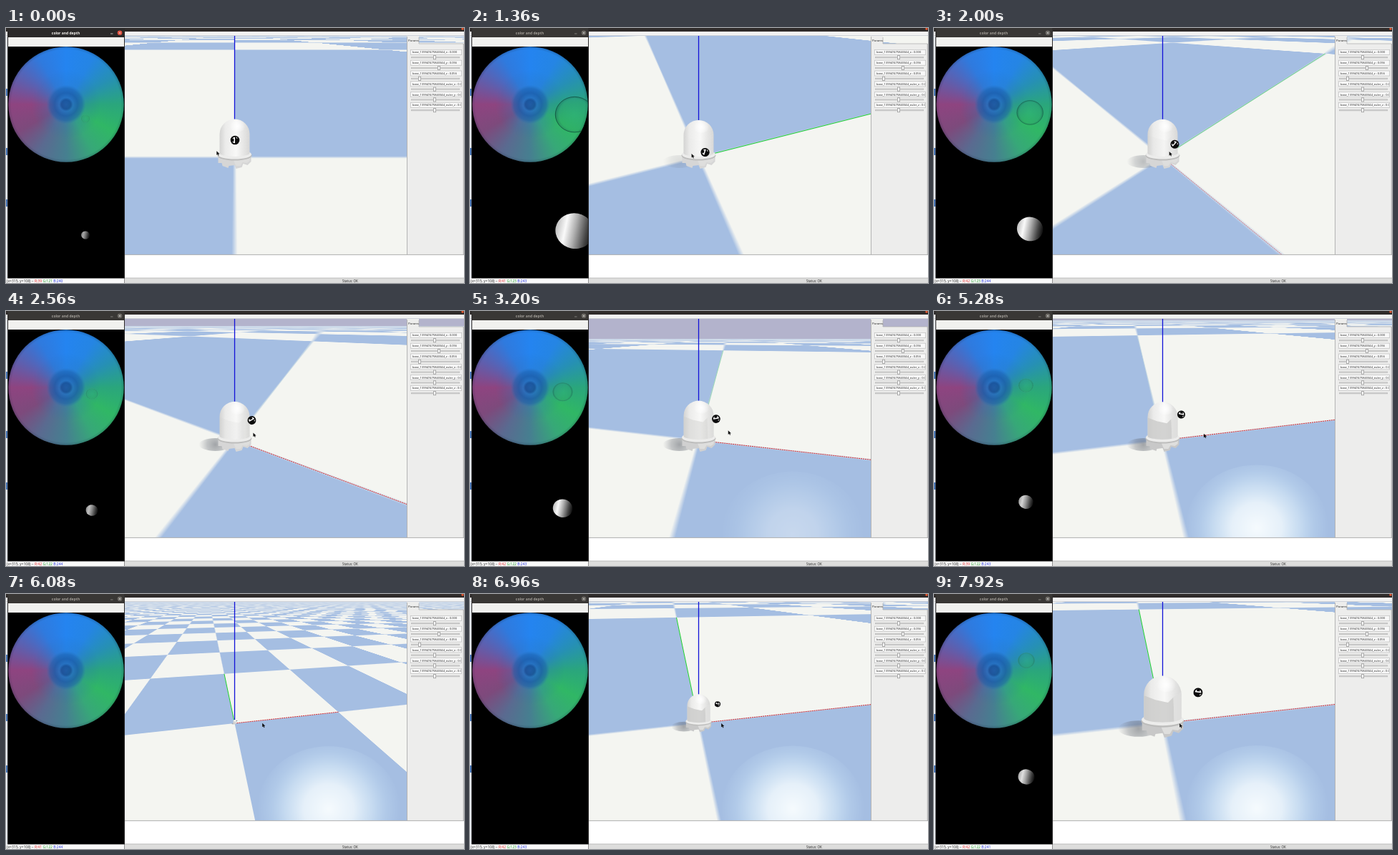
Animation, 640 px wide and 357 px high, one loop 8000 ms. Source, as an HTML page with a canvas:

```html
<!DOCTYPE html>
<html>
<head>
<meta charset="utf-8">
<style>
html, body { margin: 0; width: 100%; height: 100%; overflow: hidden; background: #fff; }
canvas { display: block; width: 640px; height: 357px; }
</style>
</head>
<body>
<canvas id="stage" width="640" height="357"></canvas>
<script>
const g = document.getElementById('stage').getContext('2d');
const LOOP = 8000, STEP = 80, TAU = Math.PI * 2;
const F = 169, CX = 319.5, CY = 181;          // focal length and centre of the 3D view
const VX = 166, VY = 11, VW = 474, VH = 306;  // visible part of the 3D view
const SANS = '"Open Sans", "Noto Sans", sans-serif';

// Points are [milliseconds, value]
const YAW = [[0, -90], [1360, -71.6], [2560, -28.4], [4080, 15.4], [5280, 9.6], [6080, 8.6]];
const PITCH = [[0, 45.5], [1360, 49.5], [2560, 43.5], [4080, 35.5], [5280, 44.8], [6080, 46], [7920, 46.5]];
const BALL_X = [[0, .5], [1360, 9], [2560, 24], [5280, 26], [7920, 39.6]];
const BALL_Y = [[0, -24], [1360, -7], [2560, -28], [5280, -36], [7920, -34.5]];

const clamp = (v, a = 0, b = 1) => Math.max(a, Math.min(b, v));

function ease(t, a, b) {
  const u = clamp((t - a) / (b - a));
  return u * u * (3 - 2 * u);
}

function along(points, t) {
  const i = points.findIndex(p => p[0] > t);
  if (i < 0) return points[points.length - 1][1];
  const [t0, a] = points[i - 1], [t1, b] = points[i];
  return a + (b - a) * (t - t0) / (t1 - t0);
}

function pose(t) {
  const yaw = along(YAW, t), pitch = along(PITCH, t);
  const y = yaw * Math.PI / 180, p = pitch * Math.PI / 180;
  const out = ease(t, 5440, 6080), back = ease(t, 6080, 7300);
  const dist = .1 * Math.pow(10.5, out - back) * (1 - .2 * back);
  const press = t < 5440 ? Math.sin(Math.PI * t / 2720) ** 2 : 0;
  const touch = 1 - ease(t, 5440, 6000) + ease(t, 6900, 7500);
  return {
    yaw, pitch, dist, k: .1 / dist,
    cy: Math.cos(y), sy: Math.sin(y), cp: Math.cos(p), sp: Math.sin(p),
    bx: along(BALL_X, t), by: along(BALL_Y, t), br: 6.3 - t / 7000,
    tx: 111 + 18 * clamp(t / 5800) + 31 * press,
    ty: 127 - 34 * t / 7920,
    tr: (6 + 5.5 * t / 7920 + 20 * press) * touch,
    mx: 369 + yaw * .83 - 18 * out - 15 * ease(t, 6080, 7920),
    my: 163 + (pitch - 35.5) * .93 + 8 * out,
    light: clamp((t - 2560) / 1500),
    green: t < 5440 ? press : 1               // flickers against the floor while dragging
  };
}

function rect(x, y, w, h, fill) {
  g.fillStyle = fill;
  g.fillRect(x, y, w, h);
}

function box(x, y, w, h, fill, line) {
  rect(x, y, w, h, line);
  rect(x + .7, y + .7, w - 1.4, h - 1.4, fill);
}

function text(s, x, y, size, fill, weight = '') {
  g.font = `${weight} ${size}px ${SANS}`;
  g.fillStyle = fill;
  g.fillText(s, x, y);
  return x + g.measureText(s).width;
}

function ellipse(x, y, rx, ry, fill) {
  g.beginPath();
  g.ellipse(x, y, rx, ry, 0, 0, TAU);
  g.fillStyle = fill;
  g.fill();
}

function poly(points, fill) {
  g.beginPath();
  points.forEach(([x, y]) => g.lineTo(x, y));
  g.closePath();
  g.fillStyle = fill;
  g.fill();
}

function line(x1, y1, x2, y2, stroke, width = 1) {
  g.beginPath();
  g.moveTo(x1, y1);
  g.lineTo(x2, y2);
  g.strokeStyle = stroke;
  g.lineWidth = width;
  g.stroke();
}

function shade(grad, stops) {
  stops.forEach(([at, c]) => grad.addColorStop(at, c));
  return grad;
}

const radial = (x, y, r, stops) => shade(g.createRadialGradient(x, y, 0, x, y, r), stops);
const across = (x1, x2, stops) => shade(g.createLinearGradient(x1, 0, x2, 0), stops);
const gray = v => `rgb(${v},${v},${v})`;

// Signed distance to the nearest tile edge, softened to -1..1
function wave(v, soft) {
  const n = Math.floor(v), f = v - n, d = Math.min(f, 1 - f);
  return (n & 1 ? -1 : 1) * Math.min(1, d / soft);
}

const view = g.createImageData(VW, VH);

function floor(c) {
  const px = view.data, ac = Math.abs(c.cy), as = Math.abs(c.sy);
  let o = 0;
  for (let j = 0; j < VH; j++) {
    const v = CY - (VY + j + .5), den = F * c.sp - v * c.cp;
    const w = v * c.dist / den, depth = c.dist + w * c.cp;
    const dr = depth / F, dw = c.dist * F * c.sp / (den * den);
    const softX = Math.max(.0014, .45 * (ac * dr + as * dw));
    const softY = Math.max(.0014, .45 * (as * dr + ac * dw));
    for (let i = 0; i < VW; i++) {
      let R = 179, G = 179, B = 204;
      if (den > .01) {
        const r = (VX + i + .5 - CX) * dr;
        const m = wave(r * c.cy + w * c.sy, softX) * wave(w * c.cy - r * c.sy, softY) / 2 + .5;
        R = 165 + 79 * m;
        G = 190 + 55 * m;
        B = 226 + 15 * m;
      }
      px[o++] = R; px[o++] = G; px[o++] = B; px[o++] = 255;
    }
  }
  g.putImageData(view, VX, VY);
}

function axis(c, r, w, color, alpha) {
  if (alpha <= 0) return;
  const near = c.dist * .2, end = c.dist + w * c.cp;
  const t = end < near ? (near - c.dist) / (w * c.cp) : 1;
  const z = c.dist + t * w * c.cp;
  g.globalAlpha = alpha;
  line(CX, CY, CX + F * t * r / z, CY - F * t * w * c.sp / z, color);
  g.globalAlpha = 1;
}

function sensor(c) {
  const top = -57 + (c.pitch - 35.5) * .35, turned = clamp((c.yaw + 90) / 60);
  g.save();
  g.translate(CX, CY);
  g.scale(c.k, c.k);

  ellipse(-27, 6, 23, 9, radial(-27, 6, 23, [[0, `rgba(80,85,95,${.5 * turned})`], [.5, `rgba(100,105,115,${.35 * turned})`],
    [1, 'rgba(120,120,130,0)']]));

  // Foot with its ring
  poly([[-23, -5], [23, -5], [23, 6], [18, 11], [12, 9], [10, 14], [2, 16], [0, 11], [-8, 12],
        [-9, 15], [-17, 12], [-18, 8], [-23, 8]], gray(214 - Math.round(14 * c.light)));
  poly([[-4, -2], [22, -4], [21, 5], [17, 8], [11, 7], [8, 12], [2, 12], [0, 8]], '#dededd');
  ellipse(0, -2.5, 24, 7, '#bdbdbc');
  ellipse(0, -4, 23.5, 6.6, '#ececeb');

  // Dome
  g.beginPath();
  g.moveTo(-21, -6);
  g.lineTo(-21, top + 21);
  g.arc(0, top + 21, 21, Math.PI, 0);
  g.lineTo(21, -6);
  g.ellipse(0, -6, 21, 5, 0, 0, Math.PI);
  g.fillStyle = across(-21.5, 21.5, [[0, '#d2d2d1'], [.2, '#ebebea'], [.55, '#f8f8f7'], [1, '#d6d6d5']]);
  g.fill();
  g.save();
  g.clip();
  g.globalAlpha = .15 * turned + .65 * c.light;
  poly([[-21, top + 22], [-8, top + 27], [6, top + 30], [12, top + 24], [13, 0], [-21, 0]], '#cbcbca');
  poly([[12, top + 24], [21, top + 18], [21, 0], [13, 0]], '#e0e0df');
  g.restore();
  ellipse(4, top + 10, 11, 8, radial(4, top + 10, 11, [[0, 'rgba(255,255,255,.9)'], [1, 'rgba(255,255,255,0)']]));
  g.restore();
}

function ball(c) {
  g.save();
  g.translate(CX + c.bx * c.k, CY + c.by * c.k);
  g.scale(c.br * c.k, c.br * c.k);
  g.rotate((c.yaw + 90) * Math.PI / 180);
  ellipse(0, 0, 1, 1, '#0c0c0c');
  g.beginPath();
  g.arc(0, 0, .68, Math.PI / 2, -Math.PI / 2);
  g.fillStyle = '#fff';
  g.fill();
  poly([[-.75, -.3], [-.25, -.35], [-.25, .35], [-.75, .3]], '#0c0c0c');
  poly([[.2, -.8], [.6, -.45], [.35, -.35]], '#ddd');
  g.restore();
}

function pointer(x, y) {
  const tip = [[0, 0], [0, 5.6], [1.4, 4.5], [2.4, 6.4], [3.3, 5.9], [2.4, 4.1], [4.2, 4]];
  poly(tip.map(([a, b]) => [x + a, y + b]), '#111');
}

function glow(c) {
  const x = 451, y = 303 + (45 - c.pitch) * 2, r = 100;
  g.save();
  g.globalAlpha = c.light;
  g.globalCompositeOperation = 'screen';
  ellipse(x, y, r, r * .88, radial(x, y, r, [[0, 'rgba(240,250,255,.95)'], [.35, 'rgba(228,245,255,.8)'],
    [.6, 'rgba(190,228,255,.5)'], [.8, 'rgba(150,205,255,.22)'], [1, 'rgba(130,190,255,0)']]));
  g.restore();
}

function scene(c) {
  g.save();
  floor(c);
  g.beginPath();
  g.rect(VX, VY, VW, VH);
  g.clip();
  glow(c);
  g.setLineDash([2, 1]);
  axis(c, c.cy, c.sy, '#dc2a2a', clamp((c.yaw + 60) / 20));
  g.setLineDash([]);
  axis(c, -c.sy, c.cy, '#1fd42c', c.green);
  line(CX, VY, CX, CY, '#1212d8', 1.3);
  sensor(c);
  ball(c);
  pointer(c.mx, c.my);
  g.restore();
}

function params() {
  rect(560, 22, 80, 295, '#ededec');
  rect(560, 11, 17, 12, '#ededec');
  line(560.5, 12, 560.5, 317, '#b4b4b4');
  line(577, 22, 639, 22, '#b0b0b0', .8);
  line(577, 13, 577, 22, '#b0b0b0', .8);
  line(639.3, 22, 639.3, 317, '#a8a8a8', .9);
  text('Params', 562, 18.6, 4.3, '#222');
  const names = ['x : 0.000', 'y : 0.056', 'z : 0.056', 'euler_x : 0.000', 'euler_y : 0.000', 'euler_z : 0.000'];
  const shift = { 1: 6, 2: -21 };
  names.forEach((name, i) => {
    const y = 30 + i * 14.8;
    box(565, y, 72, 7.8, '#f8f8f8', '#bdbdbd');
    g.save();
    g.beginPath();
    g.rect(565, y, 71, 8);
    g.clip();
    text('base_139947475843344_' + name, 568, y + 5.4, 4, '#222');
    g.restore();
    box(566, y + 10.2, 68, 2, '#dcdcdc', '#b8b8b8');
    box(597 + (shift[i] || 0), y + 8.3, 4, 5.8, '#f6f6f6', '#909090');
  });
}

function disc(c) {
  const x = 84, y = 107, r = 80.7;
  const hues = ['#2aa67c', '#30b765', '#37a878', '#467f90', '#5a6a90', '#7d4a7c',
                '#8e4480', '#5c60b0', '#2f7ade', '#2484f0', '#2585e4', '#2690b4'];
  g.save();
  g.beginPath();
  g.arc(x, y, r, 0, TAU);
  g.clip();
  const wheel = [...hues, hues[0]].map((h, i) => [i / hues.length, h]);
  rect(0, 20, 170, 175, shade(g.createConicGradient(0, x, y), wheel));
  rect(0, 20, 170, 175, radial(x, y, r, [[0, 'rgba(32,92,165,1)'], [.08, 'rgba(26,84,155,.95)'], [.12, 'rgba(38,112,190,.9)'],
    [.2, 'rgba(28,94,170,.85)'], [.28, 'rgba(30,100,175,.65)'], [.34, 'rgba(45,120,190,.25)'], [.6, 'rgba(40,110,170,0)'],
    [.95, 'rgba(20,40,60,0)'], [1, 'rgba(10,20,40,.2)']]));
  if (c.tr > .5) {
    ellipse(c.tx, c.ty, c.tr, c.tr * .92, radial(c.tx, c.ty, c.tr, [[0, 'rgba(50,185,120,.3)'], [.8, 'rgba(45,160,105,.3)'],
      [1, 'rgba(15,75,65,.4)']]));
    const dark = clamp((c.tr - 9) / 12);
    g.lineWidth = .8;
    g.strokeStyle = `rgba(${70 - 60 * dark},${180 - 120 * dark},${140 - 90 * dark},${.4 + .4 * dark})`;
    g.stroke();
  }
  g.restore();
}

function depth(c) {
  if (c.tr < .5) return;
  const near = clamp((c.tr - 5) / 9), v = a => gray(Math.round(a * (.62 + .38 * near)));
  g.save();
  g.beginPath();
  g.rect(3, 190, 162, 160);
  g.clip();
  g.translate(c.tx, c.ty + 163);
  g.rotate(.2);
  ellipse(0, 0, c.tr, c.tr * .92, across(-c.tr, c.tr, [[0, v(190)], [.25, v(250)], [.5, v(175)], [.8, v(70)], [1, v(12)]]));
  g.restore();
}

function cameraWindow(c, t) {
  const active = t < 160, ink = active ? '#f4f2ee' : '#a09c96';
  rect(2, 0, 164, 357, '#2a2828');
  rect(2.5, 0, 163, 13, active ? '#2b2929' : '#393735');
  g.textAlign = 'center';
  text('color and depth', 83.5, 8.8, 5, ink, 'bold');
  g.textAlign = 'left';
  line(146, 8, 149.5, 8, ink, .7);
  ellipse(159, 6.8, 3.3, 3.3, active ? '#e2503f' : '#6a6762');
  line(157.7, 5.5, 160.3, 8.1, '#ddd', .7);
  line(160.3, 5.5, 157.7, 8.1, '#ddd', .7);
  rect(3, 13, 162, 13, '#f1f1ef');
  rect(3, 26, 162, 324.5, '#000');
  disc(c);
  depth(c);

  const drift = (base, size, rate) => base + Math.round(size * Math.abs(Math.sin(t / rate)));
  rect(0, 350.5, 165.5, 6.5, '#fafafa');
  let x = text('(x=315, y=108) ~ ', 1, 356.4, 5, '#222');
  x = text(`R:${drift(39, 3, 1600)} `, x, 356.4, 5, '#e02020');
  x = text(`G:${drift(121, 2, 900)} `, x, 356.4, 5, '#159a20');
  text(`B:${drift(240, 4, 1300)}`, x, 356.4, 5, '#2030e0');
}

function desktop() {
  rect(0, 0, 640, 357, '#fff');
  rect(0, 0, 640, 5, '#2f2b2a');
  rect(0, 5, 640, 5, '#f3f3f3');
  rect(0, 10, 640, 1, '#cfd2d8');
  ellipse(638, 1.2, 1.6, 1.6, '#e2562f');
  rect(0, 12, 2, 339, '#e4e8ee');
  [85, 168, 240].forEach(y => rect(0, y, 2, 10, '#4a78b8'));
}

function frames() {
  line(166, 317.4, 640, 317.4, '#9a9a9a', .8);
  rect(166, 318, 474, 32, '#fff');
  rect(166, 350, 474, 7, '#dddddc');
  line(166, 350, 640, 350, '#b2b2b2', .8);
  text('Status: OK', 470, 355.6, 4.5, '#222');
}

function draw(now) {
  const t = Math.floor((now % LOOP) / STEP) * STEP, c = pose(t);
  desktop();
  scene(c);
  params();
  frames();
  cameraWindow(c, t);
}

const start = performance.now();
function tick() {
  draw(performance.now() - start);
  requestAnimationFrame(tick);
}
tick();
</script>
</body>
</html>
```
